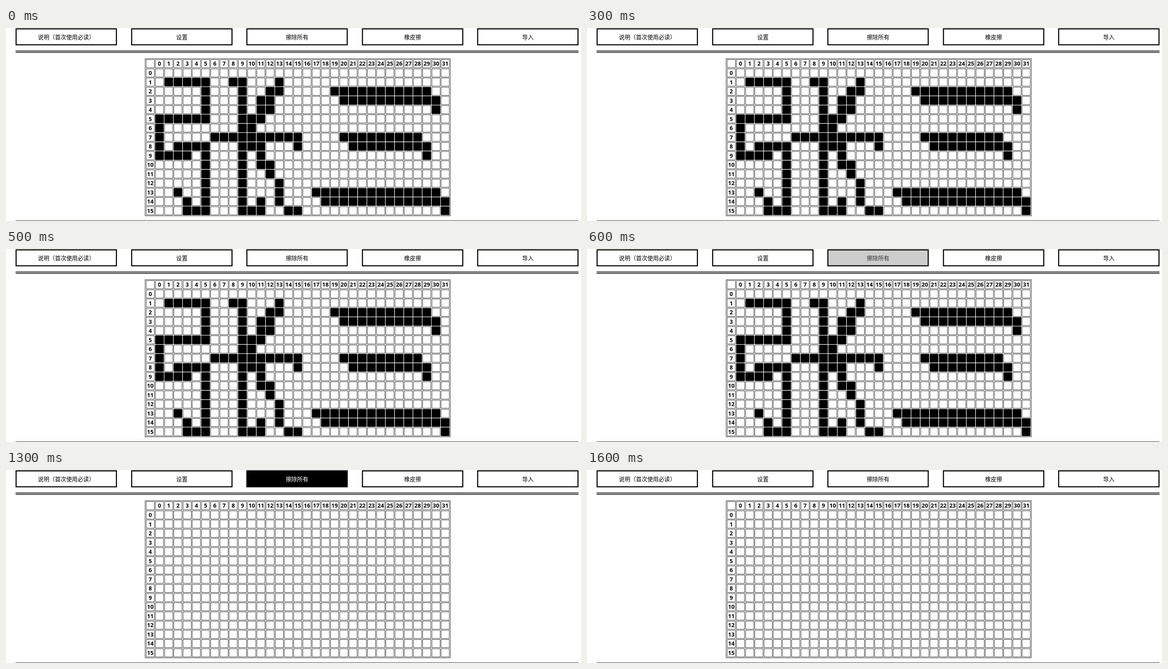
An HTML page with a canvas that plays this animation: 1280 px wide and 431 px high, repeating every 2200 ms.

```html
<!DOCTYPE html>
<html lang="zh-CN">
<head>
<meta charset="utf-8">
<style>
  html, body { margin: 0; width: 100%; height: 100%; overflow: hidden; background: #fff; }
  canvas { display: block; }
</style>
</head>
<body>
<canvas id="stage" width="1280" height="431"></canvas>
<script>
const ctx = document.getElementById('stage').getContext('2d');
const LOOP = 2200;

// The page is laid out in whole units and shown at a reduced scale.
const PAGE = { width: 1622, height: 546, left: 27, content: 1588 };
ctx.scale(1280 / PAGE.width, 431 / PAGE.height);

const BUTTONS = ['说明（首次使用必读）', '设置', '擦除所有', '橡皮擦', '导入'];
const ERASE_BUTTON = 2;
const BUTTON_FONT = '16px "Noto Sans CJK SC", "Noto Sans CJK", sans-serif';
const LABEL_FONT = 'bold 16px "Open Sans", "Noto Sans", sans-serif';

const GRID = { x: 392, y: 86, cols: 32, rows: 16, cell: 24, pitch: 26 };

// Brush paths of the first character, as "column,row" corner points
const PATHS = [
  '1,1 5,1 5,5 0,5 0,9 3,9',
  '2,8 5,8 5,15 3,15 3,14 2,13',
  '8,1 9,1 9,15 11,15 11,14',
  '13,1 13,2 12,2 12,4 11,3 11,5 10,5 10,6',
  '6,7 15,7 15,8',
  '10,8 11,8 11,10 12,10 12,11 13,12 13,14 14,15 15,15'
];

function rect(x, y, w, h, color = '#000') {
  ctx.fillStyle = color;
  ctx.fillRect(x, y, w, h);
}

function box(x, y, w, h, line, fill = '#fff') {
  rect(x, y, w, h);
  rect(x + line, y + line, w - 2 * line, h - 2 * line, fill);
}

function text(label, x, y, font, color = '#000') {
  ctx.font = font;
  ctx.fillStyle = color;
  ctx.textAlign = 'center';
  ctx.fillText(label, x, y);
}

// Column or row -1 holds the headers.
function drawCell(col, row, fill) {
  const x = GRID.x + 3 + (col + 1) * GRID.pitch;
  const y = GRID.y + 3 + (row + 1) * GRID.pitch;
  box(x, y, GRID.cell, GRID.cell, 1, fill);
  if ((col < 0) !== (row < 0)) text(Math.max(col, row), x + 12, y + 18, LABEL_FONT);
}

function paintLine([x0, y0], [x1, y1]) {
  const steps = Math.max(Math.abs(x1 - x0), Math.abs(y1 - y0));
  for (let i = 0; i <= steps; i++) {
    drawCell(x0 + (x1 - x0) * i / steps, y0 + (y1 - y0) * i / steps, '#000');
  }
}

function paintPath(path) {
  const points = path.split(' ').map(point => point.split(',').map(Number));
  for (let i = 1; i < points.length; i++) paintLine(points[i - 1], points[i]);
}

// A two-row bar, staggered by one cell and ending in a small hook
function paintBar(col, row, length) {
  const end = col + length;
  paintLine([col, row], [end - 1, row]);
  paintLine([col + 1, row + 1], [end, row + 1]);
  paintLine([end, row + 1], [end, row + 2]);
}

function drawGrid() {
  const width = (GRID.cols + 1) * GRID.pitch + 4;
  const height = (GRID.rows + 1) * GRID.pitch + 4;
  box(GRID.x, GRID.y, width, height, 1);
  for (let row = -1; row < GRID.rows; row++)
    for (let col = -1; col < GRID.cols; col++) drawCell(col, row);
}

function drawDrawing() {
  PATHS.forEach(paintPath);
  paintBar(19, 2, 11);
  paintBar(20, 7, 9);
  paintBar(17, 13, 14);
}

function eraseButtonColors(t) {
  if (t >= 700 && t < 1500) return ['#000', '#fff'];
  if (t >= 600 && t < 1600) return ['#cdcdcd', '#333'];
  return ['#fff', '#000'];
}

function drawButtons(t) {
  const width = Math.round(PAGE.content * 0.18);
  BUTTONS.forEach((label, i) => {
    const x = Math.round(PAGE.left + PAGE.content * 0.205 * i);
    const [fill, color] = i === ERASE_BUTTON ? eraseButtonColors(t) : ['#fff', '#000'];
    box(x, 1, width, 48, 3, fill);
    text(label, x + width / 2, 32, BUTTON_FONT, color);
  });
}

function draw(t) {
  rect(0, 0, PAGE.width, PAGE.height, '#fff');
  drawButtons(t);
  for (const y of [64, 68, 545]) rect(PAGE.left, y, PAGE.content, 2);
  drawGrid();
  if (t < 1300) drawDrawing();
  // The pointer crosses one cell on its way to the button.
  if (t >= 200 && t < 300) drawCell(26, 4, '#cdcdcd');
}

function frame() {
  draw(performance.now() % LOOP);
  requestAnimationFrame(frame);
}
frame();
</script>
</body>
</html>
```
